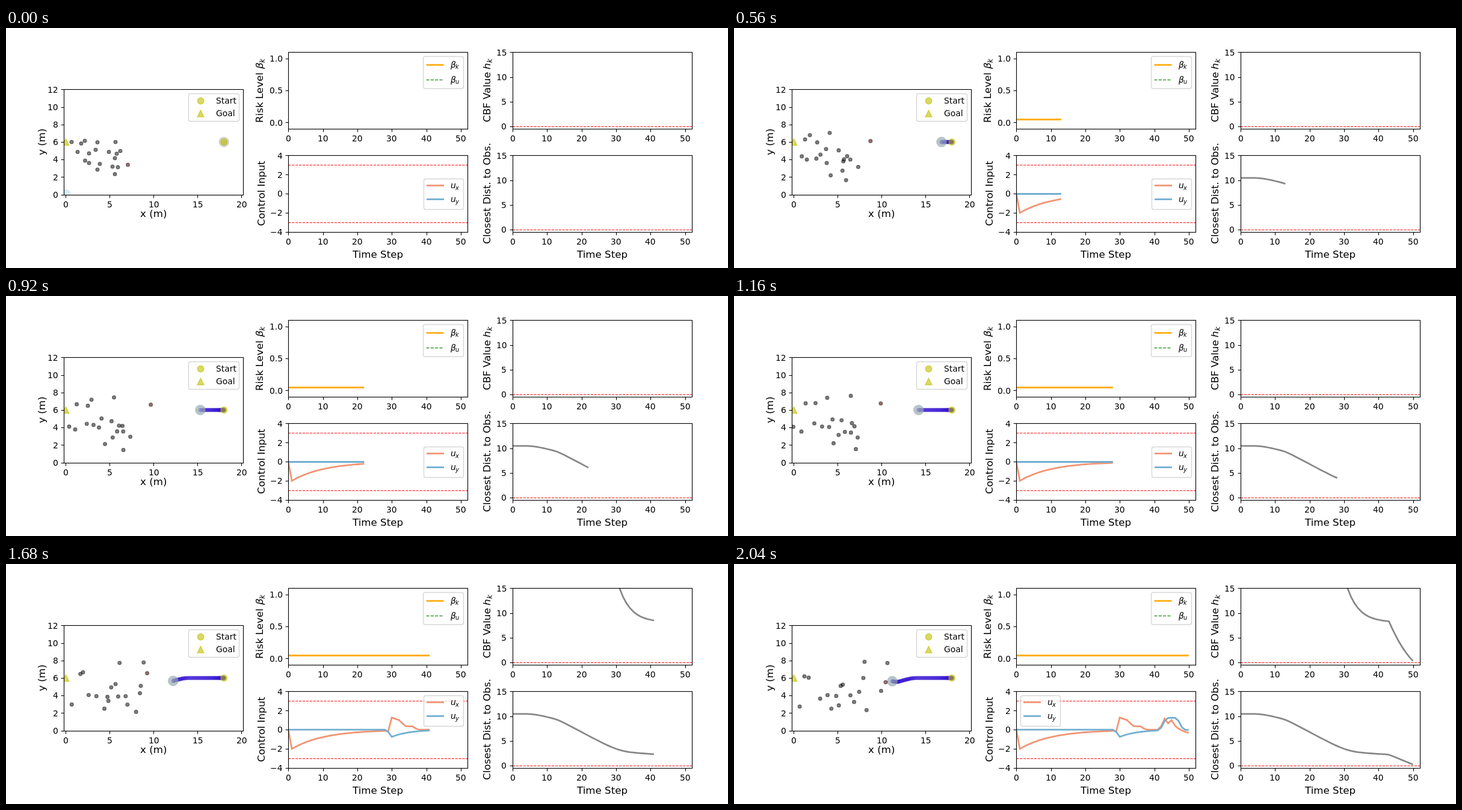
Recreate the animation shown at these times as an HTML page with a canvas. Size 1200 px wide and 400 px high, loop 2080 ms.

```html
<!DOCTYPE html>
<html lang="en">
<head>
<meta charset="utf-8">
<title>Crowd navigation</title>
<style>
html, body { margin: 0; width: 100%; height: 100%; overflow: hidden; background: #fff; }
canvas { display: block; }
</style>
</head>
<body>
<canvas id="c" width="1200" height="400"></canvas>
<script>
const ctx = document.getElementById('c').getContext('2d');
const STEP = 40, STEPS = 52, DT = 0.1;
const FONT = '"DejaVu Sans", sans-serif', SMALL = 13.89, BIG = 16.67, THICK = 2.78;
const UX = '#f19574', UY = '#72aed0', GRAY = '#888', ORANGE = '#ffaf14', OLIVE = 'rgba(191,191,0,.6)';

// Plot areas
const area = (x, y, w, h, x0, x1, y0, y1) => ({
  x, y, w, h,
  px: v => x + (v - x0) / (x1 - x0) * w,
  py: v => y + h - (v - y0) / (y1 - y0) * h
});
const map = area(96.4, 102.3, 297.9, 175.3, -0.2, 20.2, 0, 12);
const risk = area(469.3, 40.4, 298, 127.6, 0, 52, -0.1, 1.1);
const ctl = area(469.3, 212.4, 298, 127.6, 0, 52, -4, 4);
const cbf = area(842, 40.4, 298, 127.6, 0, 52, -0.5, 15);
const gap = area(842, 212.4, 298, 127.6, 0, 52, -0.5, 15);

// Control inputs: approach, first avoidance at step 30, second around step 44
function ux(k) {
  if (k < 1) return 0;
  if (k < 30) return -2 * 0.9 ** (k - 1);
  if (k < 38) return 1.4 * (1 - (k - 30) / 10) ** 2 + 0.13 * Math.cos(Math.PI / 2 * (k - 32));
  if (k < 42) return 0;
  return Math.exp(-(((k - 44) / 2.6) ** 2)) * (1 + 0.35 * Math.cos(2.7 * (k - 43))) - 0.005 * (k - 42) ** 2;
}
function uy(k) {
  if (k < 29) return 0;
  const dodge = k < 30 ? 0.25 : 0.75 * Math.exp(-0.2 * (k - 30));
  return 1.3 * Math.exp(-(((k - 45) / 2.7) ** 4)) - dodge;
}

// Robot path by double integration
const path = [{ x: 18, y: 6 }];
for (let k = 1, x = 18, y = 6, vx = 0, vy = 0; k < 51; k++) {
  x += vx * DT + ux(k) * DT * DT / 2;
  y += vy * DT + uy(k) * DT * DT / 2;
  vx += ux(k) * DT;
  vy += uy(k) * DT;
  path.push({ x, y });
}

// Smooth hinge: 0 before zero, x after it
const bend = (x, w) => w * Math.log(1 + Math.exp(x / w));
const clearance = k => 10.45 - 0.155 * bend(k - 6, 0.8) - 0.215 * bend(k - 13, 0.8)
  + 0.33 * bend(k - 31, 2) - 0.25 * bend(k - 43, 0.3);
function barrier(k) {
  const j = Math.max(0, k - 43);
  return 8.1 + 6.95 * Math.exp(-0.29 * (k - 31)) - 1.55 * j + 0.061 * j * j;
}

// Pedestrians: a wandering crowd and a few runners with start, middle and end
let seed = 11;
function rand(lo, hi) {
  seed = (seed * 16807) % 2147483647;
  return lo + (hi - lo) * seed / 2147483647;
}
const wander = ([x, y]) => {
  const dx = rand(-36, 40), dy = rand(-14, 14), w = rand(.07, .13), a = rand(0, 6.28), b = rand(0, 6.28);
  return t => ({
    x: x + dx * t / 51 + 5 * (Math.sin(w * t + a) - Math.sin(a)),
    y: y + dy * t / 51 + 7 * (Math.sin(w * t + b) - Math.sin(b))
  });
};
const run = ([x0, y0, x1, y1, x2, y2]) => {
  const M = 34, E = 51;
  const at = (p, q, r, t) => p * (t - M) * (t - E) / (M * E) + q * t * (E - t) / (M * (E - M)) + r * t * (t - M) / (E * (E - M));
  return t => ({ x: at(x0, x1, x2, t), y: at(y0, y1, y2, t) });
};
const crowd = [[119, 206.5], [125, 192.5], [131.5, 221], [138, 209], [138, 225], [149, 203], [152, 190.5], [152, 236],
  [156, 226.5], [171, 206.5], [177, 231], [181, 217], [181, 243.5], [182, 190], [202.5, 228]];
const runners = [
  [109, 190, 167, 167.5, 217, 163],
  [131, 188, 207, 165, 255, 165],
  [184, 209.5, 243, 179, 215, 190],
  [186, 232, 205, 208.5, 252, 197],
  [190, 205, 207.5, 217, 244.5, 211.5]
];
const walkers = [...crowd.map(wander), ...runners.map(run)];

// Drawing helpers
function text(s, x, y, size = SMALL, align = 'left', style = '') {
  ctx.font = `${style} ${size}px ${FONT}`;
  const shift = { left: 0, center: 0.5, right: 1 }[align];
  ctx.fillStyle = '#000';
  ctx.fillText(s, Math.round(x - shift * ctx.measureText(s).width), Math.round(y));
}
function symbol(s, sub, x, y, size = SMALL) {
  text(s, x, y, size, 'left', 'italic');
  text(sub, x + ctx.measureText(s).width, y + size * 0.17, size * 0.7, 'left', 'italic');
}
function upright(s, x, y, sym, sub) {
  ctx.save();
  ctx.translate(x, y);
  ctx.rotate(-Math.PI / 2);
  if (sym) {
    ctx.font = `${BIG}px ${FONT}`;
    const w = ctx.measureText(s).width, left = -(w + 18) / 2;
    text(s, left, 0, BIG);
    symbol(sym, sub, left + w, 0, BIG);
  } else text(s, 0, 0, BIG, 'center');
  ctx.restore();
}
// Level lines snap to whole pixels
function line(pts, color, width, dash = []) {
  const level = pts.every(p => p[1] === pts[0][1]);
  ctx.beginPath();
  pts.forEach(([x, y]) => ctx.lineTo(x, level ? Math.round(y) + .5 : y));
  ctx.strokeStyle = color;
  ctx.lineWidth = width;
  ctx.setLineDash(dash);
  ctx.stroke();
  ctx.setLineDash([]);
}
function paint(fill, edge, width = 1.39) {
  ctx.fillStyle = fill;
  ctx.fill();
  if (!edge) return;
  ctx.strokeStyle = edge;
  ctx.lineWidth = width;
  ctx.stroke();
}
function disc(x, y, r, fill, edge, width) {
  ctx.beginPath();
  ctx.arc(x, y, r, 0, 7);
  paint(fill, edge, width);
}
function triangle(x, y) {
  ctx.beginPath();
  ctx.moveTo(x, y - 5.5);
  ctx.lineTo(x + 5.5, y + 5.5);
  ctx.lineTo(x - 5.5, y + 5.5);
  ctx.closePath();
  paint(OLIVE, OLIVE);
}
function clipped(a, draw) {
  ctx.save();
  ctx.beginPath();
  ctx.rect(a.x, a.y, a.w, a.h);
  ctx.clip();
  draw();
  ctx.restore();
}
function box(x, y, w, h) {
  ctx.beginPath();
  ctx.roundRect(x, y, w, h, 3);
  paint('rgba(255,255,255,.8)', 'rgba(204,204,204,.8)');
}
const range = (from, to, by) => Array.from({ length: Math.floor((to - from) / by) + 1 }, (_, i) => from + i * by);
function frame(a, xs, ys, digits = 0) {
  const left = Math.round(a.x), top = Math.round(a.y), right = Math.round(a.x + a.w), bottom = Math.round(a.y + a.h);
  ctx.strokeStyle = '#000';
  ctx.lineWidth = 1.11;
  ctx.strokeRect(left + .5, top + .5, right - left, bottom - top);
  for (const v of xs) {
    const x = Math.round(a.px(v)) + .5;
    line([[x, bottom + .5], [x, bottom + 5.4]], '#000', 1.11);
    text(v, a.px(v), bottom + 20.6, SMALL, 'center');
  }
  for (const v of ys) {
    line([[left - 4.4, a.py(v)], [left + .5, a.py(v)]], '#000', 1.11);
    text(v.toFixed(digits).replace('-', '−'), a.x - 9.7, a.py(v) + 5.2, SMALL, 'right');
  }
}
const limit = (a, v) => line([[a.x, a.py(v)], [a.x + a.w, a.py(v)]], '#f00', 1.11, [4.1, 1.8]);
function curve(a, f, from, to, color) {
  if (to <= from) return;
  const pts = range(from, to, 1).map(k => [a.px(k), a.py(f(k))]);
  clipped(a, () => line(pts, color, THICK));
}
function key(x, y, color, sym, sub, textX, width = THICK, dash) {
  line([[x, y], [x + 29, y]], color, width, dash);
  symbol(sym, sub, textX, y + 5);
}

function drawMap(n, end) {
  const at = i => [map.px(path[i].x), map.py(path[i].y)];
  const [rx, ry] = at(Math.max(end, 0)), [sx, sy] = at(0);
  clipped(map, () => {
    for (let i = 0; i <= end; i++) disc(...at(i), 2.9, 'rgba(40,0,220,.45)', 'rgba(40,10,190,.4)', 1.2);
    const [bx, by] = n ? [rx, ry] : [map.px(0), map.py(0)];
    disc(bx, by, 8.77, 'rgba(173,216,230,.5)');
    disc(rx, ry, 8.3, 'rgba(128,128,128,.36)', 'rgba(128,128,128,.18)', 1);
    disc(sx, sy, 5.3, OLIVE, OLIVE);
    triangle(map.px(0), map.py(6));
    const dots = walkers.map(w => w(n));
    const dist = p => Math.hypot(p.x - rx, p.y - ry);
    const near = dots.reduce((a, b) => dist(b) < dist(a) ? b : a);
    for (const p of dots) {
      disc(p.x, p.y, 2.9, 'rgba(0,0,0,.5)', 'rgba(0,0,0,.42)');
      if (p === near) disc(p.x, p.y, 2.6, 'rgba(255,60,60,.25)');
    }
  });
  frame(map, range(0, 20, 5), range(0, 12, 2));
  text('x (m)', 245, 315, BIG, 'center');
  upright('y (m)', 65, 190);
  box(303.5, 109.5, 84, 46);
  disc(323.5, 121.5, 5.3, OLIVE, OLIVE);
  triangle(323.5, 142.5);
  text('Start', 348.6, 126);
  text('Goal', 348.6, 147);
}

function drawRisk(end) {
  curve(risk, () => 0.05, 0, end, ORANGE);
  frame(risk, range(0, 50, 10), range(0, 1, .5), 1);
  upright('Risk Level ', 427, 104, 'β', 'k');
  box(693.5, 47.5, 67, 53.5);
  key(698.5, 61, ORANGE, 'β', 'k', 738.5);
  key(698.5, 86, '#2ca02c', 'β', 'u', 738.5, 1.39, [5.1, 2.2]);
}

function drawControl(end) {
  limit(ctl, 3);
  limit(ctl, -3);
  curve(ctl, ux, 0, end, UX);
  curve(ctl, uy, 0, end, UY);
  frame(ctl, range(0, 50, 10), range(-4, 4, 2));
  upright('Control Input', 430, 276);
  text('Time Step', 618, 383, BIG, 'center');
  // The legend moves to the emptiest spot
  const x = end < 42 ? 694.5 : 476.5, y = end < 40 ? 251.5 : 219.5;
  box(x, y, 66, 51);
  key(x + 4.5, y + 10.7, UX, 'u', 'x', x + 44);
  key(x + 4.5, y + 33.7, UY, 'u', 'y', x + 44);
}

function drawGray(a, f, from, end) {
  limit(a, 0);
  curve(a, f, from, end, GRAY);
  frame(a, range(0, 50, 10), range(0, 15, 5));
}

function render(now) {
  const n = Math.floor(now / STEP) % STEPS, end = n - 1;
  ctx.fillStyle = '#fff';
  ctx.fillRect(0, 0, 1200, 400);
  drawMap(n, end);
  drawRisk(end);
  drawControl(end);
  drawGray(cbf, barrier, 30, end);
  drawGray(gap, clearance, 0, end);
  upright('CBF Value ', 805, 104, 'h', 'k');
  upright('Closest Dist. to Obs.', 805, 276);
  text('Time Step', 991, 383, BIG, 'center');
}

const t0 = performance.now();
function tick() {
  render(performance.now() - t0);
  requestAnimationFrame(tick);
}
tick();
</script>
</body>
</html>
```
